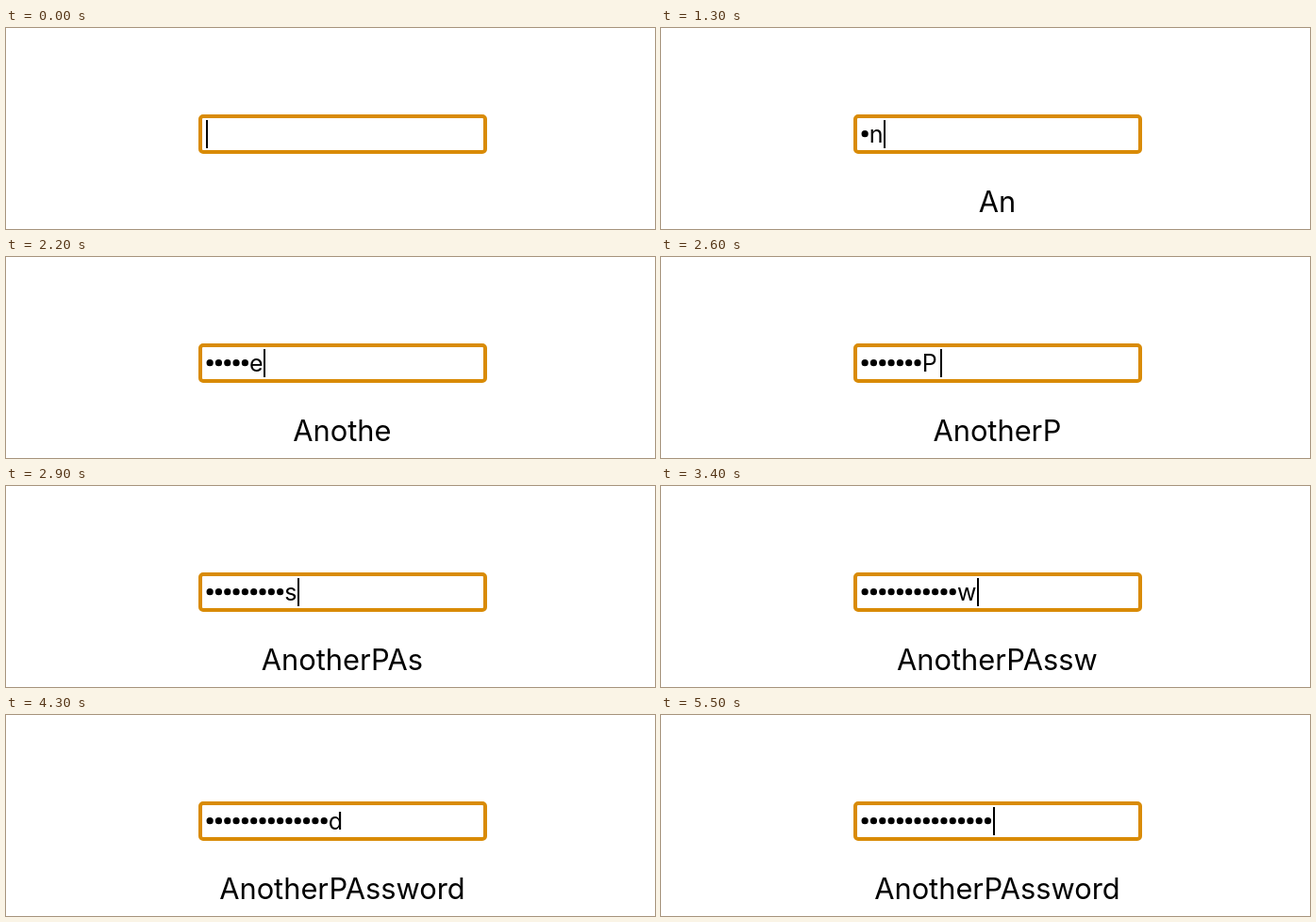
These frames come from a looping animation (688 px wide and 214 px high, 5900 ms). An HTML page with a canvas:

```html
<!DOCTYPE html>
<html lang="en">
<head>
<meta charset="utf-8">
<title>Password field</title>
<style>
html, body { margin: 0; width: 100%; height: 100%; overflow: hidden; background: #fff; }
canvas { display: block; }
</style>
</head>
<body>
<canvas id="stage" width="688" height="214"></canvas>
<script>
const ctx = document.getElementById('stage').getContext('2d');
const LOOP = 5900;
const WORD = 'AnotherPAssword';
const KEYS = [1100, 1300, 1500, 2000, 2100, 2200, 2300, 2600, 2700, 2900, 3100, 3400, 3500, 3600, 3700];
const MASK_ALL = 4500;   // the last letter turns into a bullet
const LEFT = 211.5, PITCH = 9.31, BASE = 122;

const setFont = size => { ctx.font = size + 'px Inter, "Liberation Sans", sans-serif'; };

function drawBox() {
  ctx.strokeStyle = '#d98b06';
  ctx.lineWidth = 4;
  ctx.beginPath();
  ctx.roundRect(206, 94, 302, 38, 3);
  ctx.stroke();
}

function drawBullets(count) {
  for (let i = 0; i < count; i++) {
    ctx.beginPath();
    ctx.arc(LEFT + (i + 0.5) * PITCH, 112.7, 3.6, 0, 2 * Math.PI);
    ctx.fill();
  }
}

function draw(t) {
  const typed = KEYS.filter(k => k <= t).length;
  const masked = t >= MASK_ALL ? typed : Math.max(0, typed - 1);
  const letter = WORD.slice(masked, typed);
  const blinkStart = t >= MASK_ALL ? MASK_ALL : typed ? KEYS[typed - 1] : 200;

  ctx.fillStyle = '#fff';
  ctx.fillRect(0, 0, 688, 214);
  drawBox();

  ctx.fillStyle = '#000';
  drawBullets(masked);
  setFont(25);
  ctx.textAlign = 'left';
  const x = LEFT + masked * PITCH;
  ctx.fillText(letter, x, BASE);

  if ((t - blinkStart) % 1000 < 500) {
    const gap = letter === 'P' ? 3 : 0;
    ctx.fillRect(Math.ceil(x + ctx.measureText(letter).width + gap), 98, 2, 30);
  }

  setFont(30.8);
  ctx.textAlign = 'center';
  ctx.fillText(WORD.slice(0, typed), 356.4, 196);
}

let start;
function frame(now) {
  start ??= now;
  draw((now - start) % LOOP);
  requestAnimationFrame(frame);
}
requestAnimationFrame(frame);
</script>
</body>
</html>
```
